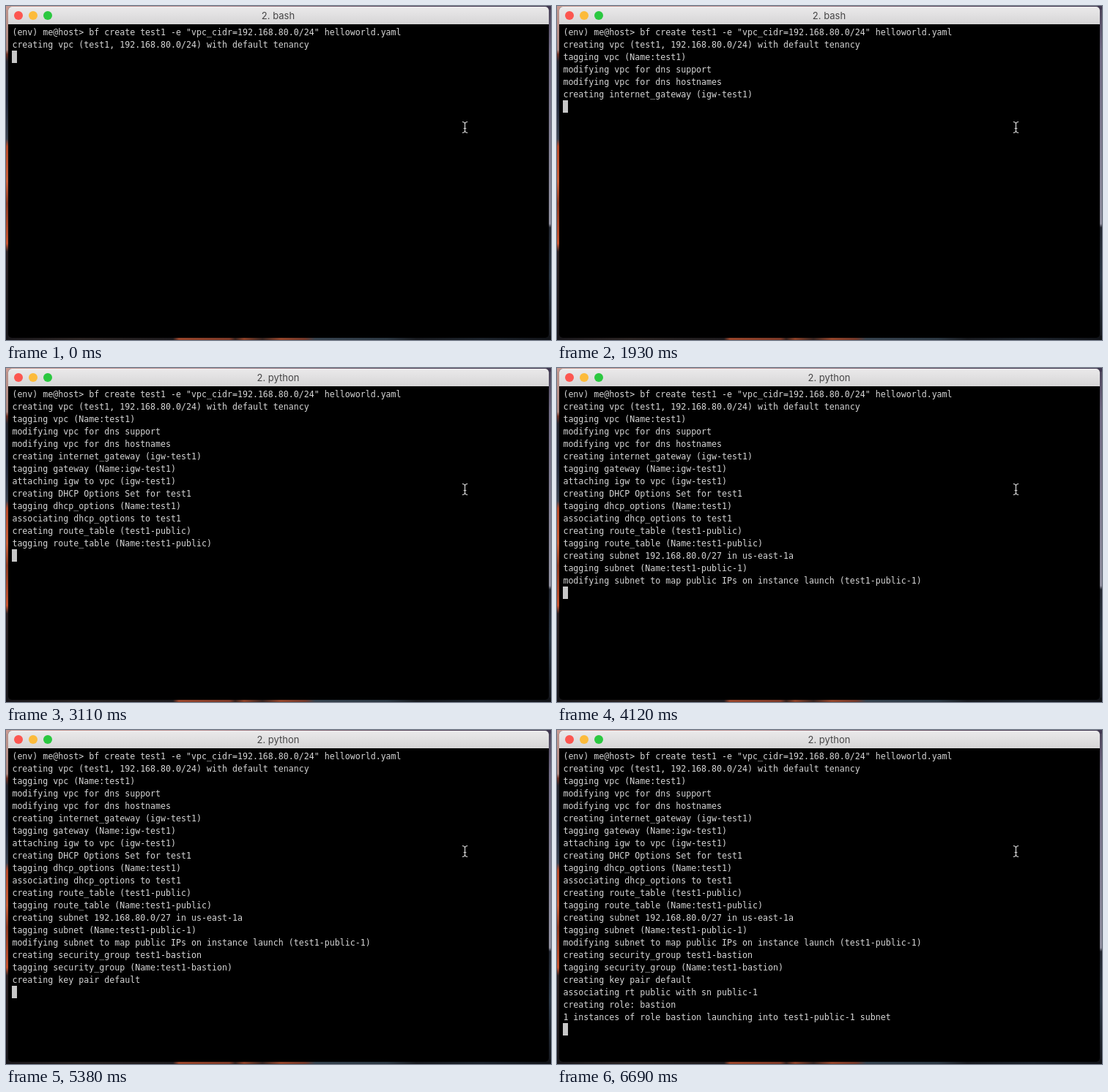
These frames come from a looping animation (744 px wide and 457 px high, 8000 ms). An HTML page:

```html
<!DOCTYPE html>
<html lang="en">
<head>
<meta charset="utf-8">
<title>Terminal</title>
<style>
html, body { margin: 0; width: 100%; height: 100%; overflow: hidden; background: #17151a; }
#stage { position: relative; width: 744px; height: 457px; overflow: hidden; }
#stage > *, #bar * { position: absolute; }
.top { left: 0; top: 0; width: 744px; height: 5px;
  background: linear-gradient(90deg, #c99a92, #b98f92 35%, #57465c 75%, #3f3750); }
.left { left: 0; top: 0; width: 5px; height: 457px;
  background: linear-gradient(#c0958d, #a98780 60px, #6b2f22 66px, #24252e 76px, #22283a 130px,
    #3a4250 182px, #b5492a 192px, #c9603a 240px, #8c3a22 270px, #c65330 325px, #2a2022 336px, #17161a); }
.right { right: 0; top: 0; width: 5px; height: 457px;
  background: linear-gradient(#4a4258, #6d6880 60px, #8c8c9c 298px, #20242e 303px, #2b3644 370px, #15171d); }
.bottom { left: 0; bottom: 0; width: 744px; height: 6px;
  background: linear-gradient(90deg, #18161a, #2a2322 100px, #1d1a1d 228px, #98442a 236px, #7c3826 305px,
    #33201c 313px, #8c4027 325px, #33221f 350px, #93442a 375px, #703628 408px, #35424e 422px,
    #2b3742 520px, #17191e 560px, #1b222b 650px, #111318); }
#window { left: 3px; top: 1px; width: 738px; height: 453px; border-radius: 5px; background: #000; }
#bar { left: 3px; top: 1px; width: 738px; height: 24px; border-radius: 5px 5px 0 0;
  background: linear-gradient(#f3f2f3, #e9e8e9 2px, #d6d5d6); }
#bar i { top: 6px; width: 12px; height: 12px; border-radius: 50%; }
#title { left: 0; top: 0; width: 737px; text-align: center;
  font: 13px/24px Inter, "Open Sans", sans-serif; color: #454445; }
#text { left: 8.4px; top: 28px; margin: 0; color: #d6d6d6;
  font: 11.627px/17px "DejaVu Sans Mono", monospace; font-variant-ligatures: none; }
#caret { left: 8px; width: 7px; height: 17px; background: #c7c7c7; }
svg { left: 0; top: 0; fill: none; stroke: #d8d8d8; stroke-width: 1.2; }
</style>
</head>
<body>
<div id="stage">
  <div class="left"></div><div class="right"></div><div class="top"></div><div class="bottom"></div>
  <div id="window"></div>
  <div id="bar">
    <i style="left:8px;background:#fc5650"></i>
    <i style="left:28px;background:#fcbb3b"></i>
    <i style="left:48px;background:#2bc840"></i>
    <div id="title"></div>
  </div>
  <pre id="text"></pre>
  <div id="caret"></div>
  <svg width="744" height="457">
    <path d="M622.8 158.5q3.2 0 3.7 2.5q.5-2.5 3.7-2.5M626.5 161v10M622.8 173.5q3.2 0 3.7-2.5q.5 2.5 3.7 2.5M624.7 167.5h3.6"/>
  </svg>
</div>
<script>
const LOOP = 8000, TITLE_CHANGE = 2030, LINE = 17, TOP = 27;
// [time the line is printed in ms, text]
const log = [
  [0, '(env) me@host> bf create test1 -e "vpc_cidr=192.168.80.0/24" helloworld.yaml'],
  [0, 'creating vpc (test1, 192.168.80.0/24) with default tenancy'],
  [350, 'tagging vpc (Name:test1)'],
  [440, 'modifying vpc for dns support'],
  [610, 'modifying vpc for dns hostnames'],
  [1930, 'creating internet_gateway (igw-test1)'],
  [1980, 'tagging gateway (Name:igw-test1)'],
  [2090, 'attaching igw to vpc (igw-test1)'],
  [2390, 'creating DHCP Options Set for test1'],
  [2570, 'tagging dhcp_options (Name:test1)'],
  [2810, 'associating dhcp_options to test1'],
  [2990, 'creating route_table (test1-public)'],
  [3110, 'tagging route_table (Name:test1-public)'],
  [3830, 'creating subnet 192.168.80.0/27 in us-east-1a'],
  [4010, 'tagging subnet (Name:test1-public-1)'],
  [4120, 'modifying subnet to map public IPs on instance launch (test1-public-1)'],
  [4960, 'creating security_group test1-bastion'],
  [5020, 'tagging security_group (Name:test1-bastion)'],
  [5380, 'creating key pair default'],
  [5620, 'associating rt public with sn public-1'],
  [5980, 'creating role: bastion'],
  [6690, '1 instances of role bastion launching into test1-public-1 subnet']
];
const [title, text, caret] = ['title', 'text', 'caret'].map(id => document.getElementById(id));
const start = performance.now();

function draw(now) {
  const t = Math.max(0, now - start) % LOOP;
  const shown = log.filter(([time]) => time <= t);
  text.textContent = shown.map(([, line]) => line).join('\n');
  caret.style.top = TOP + LINE * shown.length + 'px';
  title.textContent = t < TITLE_CHANGE ? '2. bash' : '2. python';
  requestAnimationFrame(draw);
}
draw(start);
</script>
</body>
</html>
```
